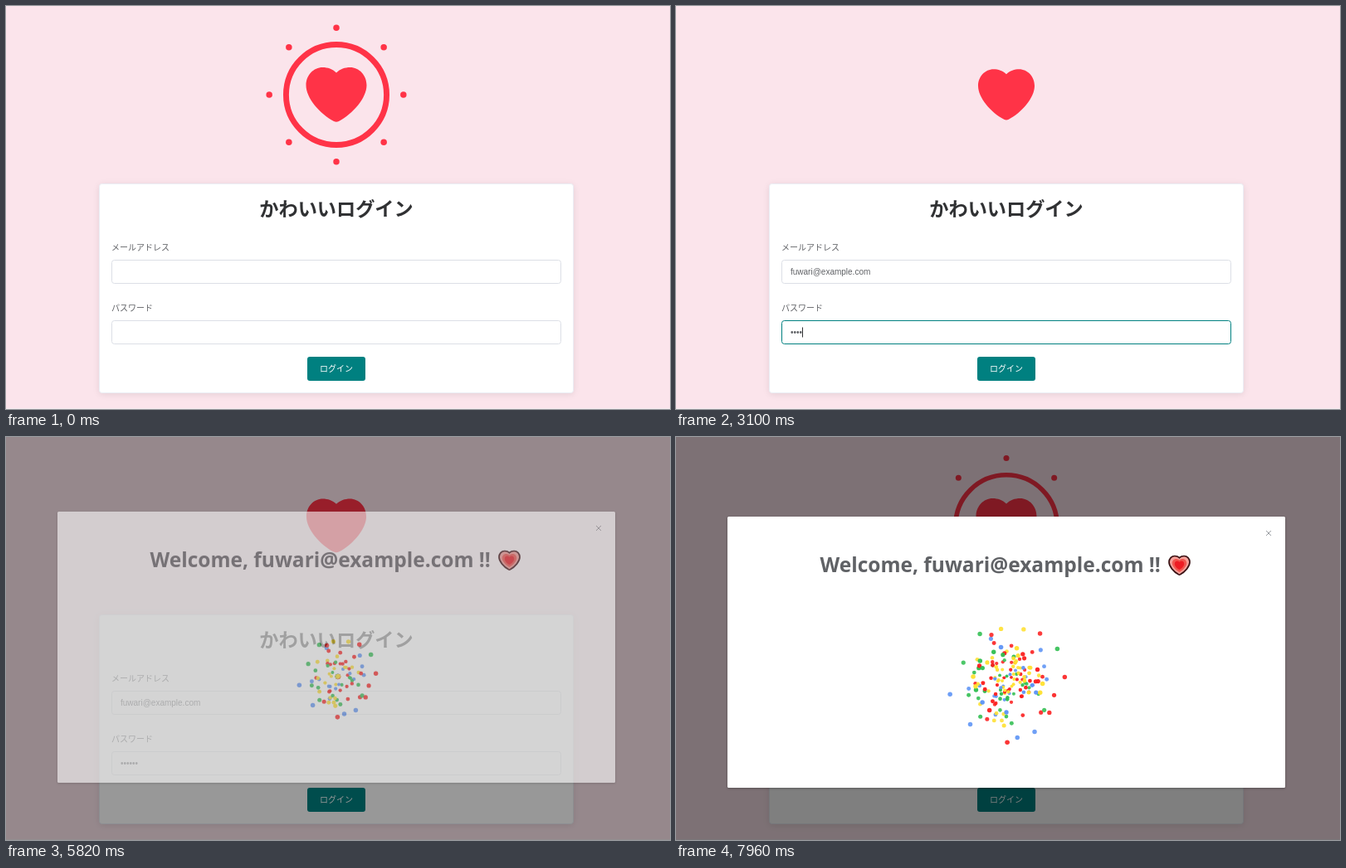
These frames come from a looping animation (800 by 486 pixels, 8 s). An HTML page with a canvas:

```html
<!DOCTYPE html>
<html lang="ja">
<head>
<meta charset="utf-8">
<title>かわいいログイン</title>
<style>
  html, body { margin: 0; width: 100%; height: 100%; overflow: hidden; background: #fbe4eb; }
  canvas { display: block; width: 100vw; height: 100vh; }
</style>
</head>
<body>
<canvas id="stage" width="800" height="486"></canvas>
<script>
const stage = document.getElementById('stage').getContext('2d');
const sheet = Object.assign(document.createElement('canvas'), { width: 800, height: 486 }).getContext('2d');
let ctx = stage;

const LOOP = 8000, BEAT = 883, TAU = Math.PI * 2;
const EMAIL = 'fuwari@example.com';
const JP = '"Noto Sans CJK JP", "Noto Sans CJK", sans-serif';
const UI = '"Liberation Sans", Arial, sans-serif';
const LATIN = '"Noto Sans", "Open Sans", sans-serif';
const RED = '#ff3347', TEAL = [0, 128, 128], LINE = [220, 223, 230], TEXT = '#606266';

// Event times in ms
const EMAIL_FOCUS = 700, EMAIL_TYPE = 850, KEY = 45;
const PASS_FOCUS = 2130, PASS_KEYS = [2800, 2930, 3030, 3090, 3190, 3270];
const SUBMIT = 4650, WELCOME = 5720;
const BURSTS = [5720, 5820, 7775, 7875];

const clamp = x => Math.max(0, Math.min(1, x));
const lerp = (a, b, x) => a + (b - a) * x;
const mix = (a, b, x) => `rgb(${a.map((v, i) => Math.round(lerp(v, b[i], x)))})`;

// CSS "ease" timing
function ease(x) {
  if (x <= 0) return 0;
  if (x >= 1) return 1;
  let lo = 0, hi = 1, u = 0;
  for (let i = 0; i < 20; i++) {
    u = (lo + hi) / 2;
    const px = 0.75 * u * (1 - u) + u * u * u;
    if (px < x) lo = u; else hi = u;
  }
  return 0.3 * u * (1 - u) ** 2 + 3 * u * u * (1 - u) + u * u * u;
}

function track(keys, t) {
  let i = 1;
  while (i < keys.length - 1 && t > keys[i][0]) i++;
  const [t0, a] = keys[i - 1], [t1, b] = keys[i];
  return lerp(a, b, clamp((t - t0) / (t1 - t0)));
}

function random(seed) {
  return () => {
    seed = (seed * 1664525 + 1013904223) >>> 0;
    return seed / 4294967296;
  };
}

function dot(x, y, r, color) {
  ctx.fillStyle = color;
  ctx.beginPath();
  ctx.arc(x, y, r, 0, TAU);
  ctx.fill();
}

function box(x, y, w, h, r, fill, stroke) {
  ctx.beginPath();
  ctx.roundRect(x, y, w, h, r);
  ctx.fillStyle = fill;
  ctx.fill();
  if (stroke) {
    ctx.shadowColor = 'transparent';
    ctx.strokeStyle = stroke;
    ctx.lineWidth = 1;
    ctx.stroke();
  }
}

function shadowBox(blur, dy, shade, ...args) {
  ctx.save();
  ctx.shadowColor = shade;
  ctx.shadowBlur = blur;
  ctx.shadowOffsetY = dy;
  box(...args);
  ctx.restore();
}

function text(str, x, y, font, color, align = 'left') {
  ctx.font = font;
  ctx.fillStyle = color;
  ctx.textAlign = align;
  ctx.fillText(str, x, y);
}

// Heart 73 units wide, centred on the origin
const heart = new Path2D('M0-26.5C-4.5-31-10.5-33-16.5-33C-27.5-33-36.5-23.5-36.5-11.5' +
  'C-36.5 4-20 23-3 32Q0 33.5 3 32C20 23 36.5 4 36.5-11.5C36.5-23.5 27.5-33 16.5-33C10.5-33 4.5-31 0-26.5Z');

function drawHeart(x, y, w, color, outline) {
  ctx.save();
  ctx.translate(x, y);
  ctx.scale(w / 73, w / 73);
  ctx.fillStyle = color;
  ctx.fill(heart);
  if (outline) {
    ctx.strokeStyle = outline;
    ctx.lineWidth = 5;
    ctx.stroke(heart);
  }
  ctx.restore();
}

const HEART_WIDTH = [[0, 73], [250, 72.5], [380, 68], [455, 68], [522, 72],
  [640, 87], [705, 94], [749, 92], [806, 83], [883, 73]];

function drawLogo(t) {
  const phase = t % BEAT, cx = 398, cy = 107;
  // The burst runs on into the next beat
  const p = phase < 300 ? phase + BEAT : phase;

  const outer = 64 * (1 - (1 - clamp((p - 752) / 46)) ** 2);
  const inner = 64 * (1 - clamp((1017 - p) / 405) ** 2);
  if (outer > inner) {
    ctx.strokeStyle = RED;
    ctx.lineWidth = outer - inner;
    ctx.beginPath();
    ctx.arc(cx, cy, (outer + inner) / 2, 0, TAU);
    ctx.stroke();
  }

  const size = 5.2 * clamp((p - 690) / 40) * (1 - clamp((p - 720) / 310) ** 2);
  if (size > 0) {
    const r = 85 - 16 * ((1025 - p) / 276) ** 2;
    for (let i = 0; i < 8; i++) {
      const a = i * TAU / 8;
      dot(cx + r * Math.cos(a), cy + r * Math.sin(a), size, RED);
    }
  }
  drawHeart(cx, cy, track(HEART_WIDTH, phase), RED);
}

function caret(x, y, since) {
  if (since % 1060 > 530) return;
  ctx.fillStyle = '#303133';
  ctx.fillRect(Math.round(x), y - 6, 1, 12);
}

function field(y, t, from, to, value, typedAt) {
  const focus = ease((t - from) / 200) * (1 - ease((t - to) / 200));
  box(127.5, y + 0.5, 541, 28, 3, '#fff', mix(LINE, TEAL, focus));
  text(value, 138, y + 18, '10px ' + UI, TEXT);
  if (t >= from && t < to) {
    caret(138 + ctx.measureText(value).width, y + 14.5, t - Math.max(from, typedAt));
  }
}

function squiggle(x, y, w) {
  ctx.strokeStyle = '#e8333f';
  ctx.lineWidth = 0.8;
  ctx.beginPath();
  for (let i = 0; i <= w; i += 1.5) ctx.lineTo(x + i, y + (i / 1.5 % 2 ? 0.9 : -0.9));
  ctx.stroke();
}

function spinner(x, y, t) {
  ctx.save();
  ctx.translate(x, y);
  ctx.rotate(t / 2000 * TAU);
  ctx.strokeStyle = '#fff';
  ctx.lineWidth = 0.9;
  for (let i = 0; i < 8; i++) {
    ctx.rotate(TAU / 8);
    ctx.beginPath();
    ctx.moveTo(0, 2);
    ctx.lineTo(0, 4.6);
    ctx.stroke();
  }
  ctx.restore();
}

function drawForm(t) {
  shadowBox(9, 1.5, 'rgba(0,0,0,.1)', 112.5, 214.5, 571, 252, 3, '#fff', '#ebeef5');
  text('かわいいログイン', 398, 253, 'bold 23.2px ' + JP, '#303133', 'center');
  text('メールアドレス', 127, 295, '10px ' + JP, TEXT);
  text('パスワード', 127, 368, '10px ' + JP, TEXT);

  const typed = Math.floor(clamp((t - EMAIL_TYPE) / (KEY * EMAIL.length)) * EMAIL.length);
  const email = EMAIL.slice(0, typed);
  const emailEnd = EMAIL_TYPE + KEY * typed;
  field(306, t, EMAIL_FOCUS, PASS_FOCUS, email, typed ? emailEnd : 0);
  if (typed > 6 && t < PASS_FOCUS) {
    squiggle(138, 326, ctx.measureText(EMAIL.split('@')[0]).width);
  }

  const keys = PASS_KEYS.filter(k => t >= k);
  field(379, t, PASS_FOCUS, SUBMIT, '•'.repeat(keys.length), keys.length ? keys[keys.length - 1] : 0);

  const loading = t >= SUBMIT && t < WELCOME;
  if (loading) {
    box(356, 423, 84, 29, 3, '#59acac');
    spinner(376, 437.5, t - SUBMIT);
  } else {
    box(363, 423, 70, 29, 3, '#008080');
  }
  text('ログイン', loading ? 385 : 378, 441, '10px ' + JP, '#fff');
}

const COLORS = ['#fb1c1c', '#ffe02e', '#2dbd4e', '#5b92f5'];

function drawBurst(age, seed) {
  if (age <= 0 || age > 1750) return;
  const rnd = random(seed);
  const reach = 107 * (1 - (1 - clamp(age / 1700)) ** 10);
  for (let i = 0; i < 85; i++) {
    const a = rnd() * TAU, s = 0.15 + 0.85 * rnd() ** 1.2, life = 1250 + 500 * rnd();
    const pick = rnd();
    const color = COLORS[pick < 0.36 ? 0 : pick < 0.62 ? 1 : pick < 0.81 ? 2 : 3];
    ctx.globalAlpha = clamp(1 - age / life);
    dot(400 + reach * s * Math.cos(a), 295 + reach * s * Math.sin(a), 1.8 + s, color);
  }
  ctx.globalAlpha = 1;
}

function drawDialog(t) {
  ctx.clearRect(0, 0, 800, 486);
  shadowBox(3, 1, 'rgba(0,0,0,.3)', 62, 96, 672, 327, 1.5, '#fff');

  ctx.strokeStyle = '#909399';
  ctx.lineWidth = 0.9;
  ctx.beginPath();
  for (const d of [-3, 3]) {
    ctx.moveTo(714 - d, 113);
    ctx.lineTo(714 + d, 119);
  }
  ctx.stroke();

  text(`Welcome, ${EMAIL} !!`, 173.5, 163, 'bold 24.5px ' + LATIN, TEXT);
  drawHeart(606.5, 154.8, 25, '#f5a09a', '#3a1214');
  drawHeart(606.5, 154.8, 17.5, '#f0564f');
  drawHeart(606.5, 154.8, 11.5, '#ee1c24');

  BURSTS.forEach((start, i) => drawBurst(t - start, 41 + 977 * (i % 2)));
}

function drawWelcome(t) {
  const age = t - WELCOME;
  if (age < 0) return;
  ctx.fillStyle = `rgba(0,0,0,${0.5 * ease(age / 200)})`;
  ctx.fillRect(0, 0, 800, 486);

  // The dialog fades as one layer
  ctx = sheet;
  drawDialog(t);
  ctx = stage;
  const show = ease(age / 300);
  ctx.globalAlpha = show;
  ctx.drawImage(sheet.canvas, 0, -14.5 * (1 - show));
  ctx.globalAlpha = 1;
}

function frame(now) {
  const t = now % LOOP;
  ctx.fillStyle = '#fbe4eb';
  ctx.fillRect(0, 0, 800, 486);
  ctx.fillStyle = '#f6eef1';
  ctx.fillRect(0, 485, 800, 1);
  drawLogo(t);
  drawForm(t);
  drawWelcome(t);
}

const begin = performance.now();
function tick() {
  frame(performance.now() - begin);
  requestAnimationFrame(tick);
}
tick();
</script>
</body>
</html>
```
